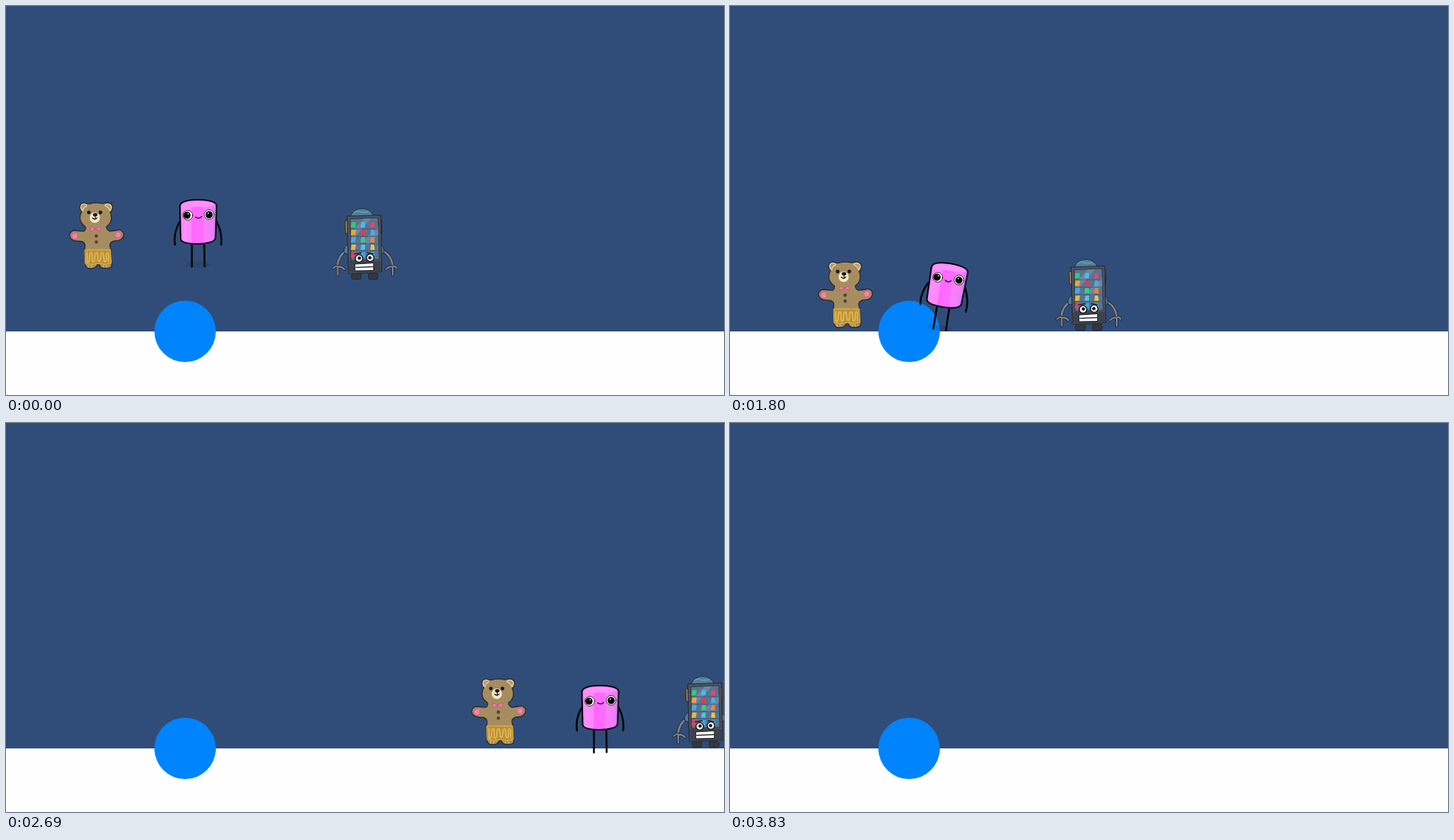
Recreate the animation shown at these times as an HTML page. Size 958 by 520 pixels, loop 4.14 s.

```html
<!DOCTYPE html>
<html lang="en">
<head>
<meta charset="utf-8">
<title>Falling friends</title>
<style>
  html, body { margin: 0; width: 100%; height: 100%; overflow: hidden; background: #304d79; }
  svg { display: block; width: 100vw; height: 100vh; }
</style>
</head>
<body>
<svg viewBox="0 0 958 520" preserveAspectRatio="none">
  <defs>
    <linearGradient id="candy">
      <stop offset="0" stop-color="#ff80ff"/>
      <stop offset=".14" stop-color="#ff90ff"/>
      <stop offset=".3" stop-color="#ff84ff"/>
      <stop offset=".34" stop-color="#ff68ff"/>
      <stop offset=".62" stop-color="#ff6cff"/>
      <stop offset=".66" stop-color="#fb80ff"/>
      <stop offset=".86" stop-color="#f07ffc"/>
      <stop offset="1" stop-color="#d678ec"/>
    </linearGradient>
  </defs>
  <rect width="958" height="520" fill="#304d79"/>
  <rect y="435" width="958" height="85" fill="#fefefe"/>
  <circle cx="239" cy="435" r="41" fill="#0084fd"/>

  <g id="robot" stroke-linecap="round" stroke-linejoin="round">
    <g fill="none" stroke="#272b35" stroke-width="4.4">
      <path d="M453 328 Q444 333 442 347M504 328 Q514 334 516 347"/>
    </g>
    <g fill="none" stroke="#7a8392" stroke-width="2.600">
      <path d="M453 328 Q444 333 442 347M504 328 Q514 334 516 347"/>
    </g>
    <g fill="none" stroke="#272b35" stroke-width="4">
      <path d="M436.500 350.500 Q441 346 443 349 Q447 347.500 451.500 352M442.500 349 V359.500M507 352 Q512 347 516 349 Q519 346 521 350.500M516 349 V359.500"/>
    </g>
    <g fill="none" stroke="#7c8494" stroke-width="2">
      <path d="M436.500 350.500 Q441 346 443 349 Q447 347.500 451.500 352M442.500 349 V359.500M507 352 Q512 347 516 349 Q519 346 521 350.500M516 349 V359.500"/>
    </g>
    <g stroke="#252a35">
      <path d="M456 319 Q450 321 451 330 L457 332ZM500 319 Q505 321 504 330 L499 332Z" fill="#477ca5"/>
      <path d="M459.500 281 Q463 271 475 270.500 Q487 271 490.500 281Z" fill="#4c809d"/>
      <path d="M453 287 h3.500 v17 h-3z M498.500 286 h3 v18 h-3z" fill="#dc9837"/>
      <rect x="461" y="357" width="13" height="8.500" rx="2.500" fill="#343740"/>
      <rect x="483.500" y="357" width="13" height="8.500" rx="2.500" fill="#343740"/>
      <path d="M455 281 L500 279.500 L501.500 355 Q480 358.500 457 357Z" fill="#4d5462" stroke-width="1.200"/>
      <path d="M459.500 284.500 L496.500 283 L498 339 L460.500 340Z" fill="#587391" stroke-width=".8"/>
    </g>
    <path d="M464 276 q5 -3 8 -1 t11 0" fill="none" stroke="#78b3bc"/>
    <path d="M461 302 L478 284 h9 L461 314ZM477 314 L497 295 V306 L483 319Z" fill="#8ba5bf" opacity=".4"/>
    <g id="goods"></g>
    <path d="M460 298h37M460 308h37M460 318h37M460 327h37" stroke="#42536a" stroke-width=".8"/>
    <path d="M457.500 341 h43 l.5 14 q-20 3 -42.500 1z" fill="#3e424c"/>
    <g fill="#fff" stroke="#1b1d25" stroke-width="1.500">
      <circle cx="471" cy="337.500" r="5"/><circle cx="486" cy="336.500" r="5"/>
      <path d="M466 345 L490.500 343.500 V353.500 L466 354Z" stroke-width="1"/>
    </g>
    <circle cx="471.500" cy="337" r="2.300" fill="#171b24"/>
    <circle cx="485.500" cy="336.500" r="2.300" fill="#171b24"/>
    <path d="M467 349.500 L490 348.500" stroke="#30333c" stroke-width="1.300"/>
    <path d="M465 331.500 l9 -1.500M482 330 l8 1" stroke="#22252d" stroke-width="1.500"/>
  </g>

  <g id="bear" stroke-linecap="round" stroke-linejoin="round">
    <path d="M101 275 C97 270 98 262 105 263.500 C108 264 110 265 111 264.500 Q120 262 129 264 C131 264 134 262 138 263.500 C144 265 143 273 139 275.500 C142 283 141 290 134 295 Q134 299 138 301 Q144 300.500 149 299.500 C155 298.500 158 303 156.500 308 C155 313 150 314 145 314 Q139 315 138.500 320 L140 326 L141 346 C142 350 137 351 132 350.500 C127 351 125 348 124.500 345.500 L122 345 C121 349 118 351 113 351 C107 351 105.500 348 105.500 345 L105 326 L105.500 320 Q105 315 99 314.500 C93 314.500 87 313.500 85.500 309 C84 304 87 300 92 300 Q99 301 104 301 Q107 299 106 295 C98 290 97 282 101 275Z" fill="#a68d60" stroke="#2d2b2c" stroke-width="1.300"/>
    <path d="M101 273 Q98 265 104 264.500 Q109 265 107 268 Q103 269 102.500 274M132 267 Q133 263.500 138 265 Q143 269 138.500 273.500 Q137 269 132 267" fill="#b59c70" stroke="#ead9ae" stroke-width="1.200"/>
    <ellipse cx="118.500" cy="283" rx="6.800" ry="7" fill="#f4e8c5"/>
    <g fill="#191617">
      <circle cx="110.500" cy="276" r="2.400"/><circle cx="126" cy="276" r="2.400"/>
      <ellipse cx="119" cy="279" rx="3" ry="2.200"/>
    </g>
    <path d="M119 281 v3 M115.500 283.500 Q119 287 121.500 283" fill="none" stroke="#191617" stroke-width="1.200"/>
    <path d="M119.500 298 l-6.500 -3 v6z l6.500 -3 v6z" fill="#f37dab" stroke="#d34b83" stroke-width=".8"/>
    <g fill="#f582ae" stroke="#d9568d" stroke-width=".8">
      <circle cx="92" cy="307.500" r="4"/><circle cx="149.500" cy="306" r="4"/>
    </g>
    <g fill="#514331"><circle cx="120.500" cy="307.500" r="2.200"/><circle cx="120.500" cy="315.500" r="2.200"/></g>
    <path d="M105.500 326 H139.500 L140.500 344 Q132 346.500 124 344.500 Q114 346.500 106 344.500Z" fill="#be9238" stroke="#e8b840"/>
    <path d="M108 329 V342 Q110 344 111 340 L112 331 Q114 328 115 332 V341 Q117 344 118 340 L119 331 Q121 328 122 332 L123 340 Q125 343 126 339 L127 331 Q129 328 130 332 L131 341 Q133 343 134 339 V331 Q136 328 137 332 V342" fill="none" stroke="#f0cc62" stroke-width="1.100"/>
    <path d="M110 349 v-2M114 349 v-2M130 349 v-2M134 349 v-2" stroke="#dfc99a"/>
  </g>

  <g id="mallow" stroke-linecap="round" stroke-linejoin="round">
    <ellipse id="shade" cx="256" cy="346" rx="17" ry="4" opacity=".1"/>
    <g fill="none" stroke="#050307" stroke-width="2.500">
      <path d="M248 317 V348.500M264.500 317 L265 348M231.500 289 Q223 304 225.500 319M281 288 Q289 304 287 319"/>
      <path d="M232 268 C232 262 241 259.200 256 259 C271 259.200 280.500 261 281 267 L279.500 310 C279 315.500 268 318 256 318 C244 318 233.500 316.500 233 311Z" fill="url(#candy)" stroke-width="2"/>
    </g>
    <path d="M233.500 267 Q238 260.500 256 260.300 Q275 260.500 279.500 266 Q270 269 254 268.500 Q239 269.500 233.500 267Z" fill="#ff90ff"/>
    <g fill="#fff" stroke="#0b060d" stroke-width=".8">
      <circle cx="242.500" cy="279.800" r="6.500"/><circle cx="271" cy="278.800" r="6.500"/>
    </g>
    <circle cx="241.500" cy="279.800" r="4.800"/><circle cx="271" cy="279" r="4.800"/>
    <circle cx="243" cy="277.800" r=".9" fill="#fff"/><circle cx="269.800" cy="277" r=".9" fill="#fff"/>
    <path d="M253 282 Q257 285.500 261 281.500" fill="none" stroke="#210c24" stroke-width="1.300"/>
  </g>
</svg>
<script>
const LOOP = 4140, DROP = 1320;
const $ = id => document.getElementById(id);

// Each row is [time in ms, value].
const walkX = [[1480, 0], [1800, 33], [1830, 39], [2000, 165], [2200, 291], [2360, 374],
  [2690, 536], [2890, 613], [3070, 677], [3420, 780], [3800, 870], [3830, 880]];
const mallowRest = [[1800, 85], [1840, 87], [1960, 89], [2200, 89], [2400, 92]];
const mallowTurn = [[1660, 0], [1800, 9.5], [1830, 10], [1980, 4], [2200, -4], [2450, 0]];
const robotX = [[2000, 0], [2200, 159], [2360, 264], [2690, 454], [2900, 565]];
const robotRest = [[2000, 68], [2100, 56], [2200, 48.5], [2360, 58], [2460, 68]];
const robotTurn = [[2000, 0], [2200, -13], [2360, -8], [2480, 0]];

// Smooth curve through the rows without overshoot.
function at(rows, t) {
  const last = rows.length - 1;
  if (t <= rows[0][0]) return rows[0][1];
  if (t >= rows[last][0]) return rows[last][1];
  const i = rows.findIndex(r => r[0] > t) - 1;
  const rate = k => (rows[k + 1][1] - rows[k][1]) / (rows[k + 1][0] - rows[k][0]);
  const slope = k => {
    if (k === 0) return 0;
    if (k === last) return rate(k - 1);
    const a = rate(k - 1), b = rate(k);
    return a * b > 0 ? 2 * a * b / (a + b) : 0;
  };
  const [t0, v0] = rows[i], [t1, v1] = rows[i + 1];
  const d = t1 - t0, u = (t - t0) / d, w = 1 - u;
  return w * w * ((1 + 2 * u) * v0 + u * d * slope(i)) +
         u * u * ((1 + 2 * w) * v1 - w * d * slope(i + 1));
}

const fall = t => t < DROP ? 0 : 0.00028 * (t - 1240) ** 2;

function place(id, x, y, turn, cx, cy) {
  $(id).setAttribute('transform', `translate(${x} ${y}) rotate(${turn} ${cx} ${cy})`);
}

function stockShelves() {
  const colors = ['#35c978', '#51b6e8', '#e8446a', '#f0a33a', '#d93e59', '#4cafe0',
    '#45a9e8', '#3ccb85', '#f0813c', '#e9b73e', '#57bce9', '#e6c54a', '#d9445e', '#3fa6e3', '#4fc0df'];
  $('goods').innerHTML = colors.map((c, i) => {
    const x = 461 + i % 3 * 12, y = 289 + Math.floor(i / 3) * 10, k = i * 7 % 3;
    return `<path d="M${x + k} ${y}h${6 - k}l${k - 1} 7h-6z" fill="${c}"/>`;
  }).join('');
}

function draw(t) {
  const x = at(walkX, t), y = fall(t);
  place('bear', x, Math.min(y, 79), 0, 120, 306);
  place('mallow', x, Math.min(y, at(mallowRest, t)), at(mallowTurn, t), 256.5, 288);
  place('robot', at(robotX, t), Math.min(y, at(robotRest, t)), at(robotTurn, t), 478, 318);
  $('shade').setAttribute('opacity', t > 2150 && t < 2900 ? 0 : 0.1);
}

stockShelves();
const start = performance.now();
function tick() {
  draw((performance.now() - start) % LOOP);
  requestAnimationFrame(tick);
}
tick();
</script>
</body>
</html>
```
